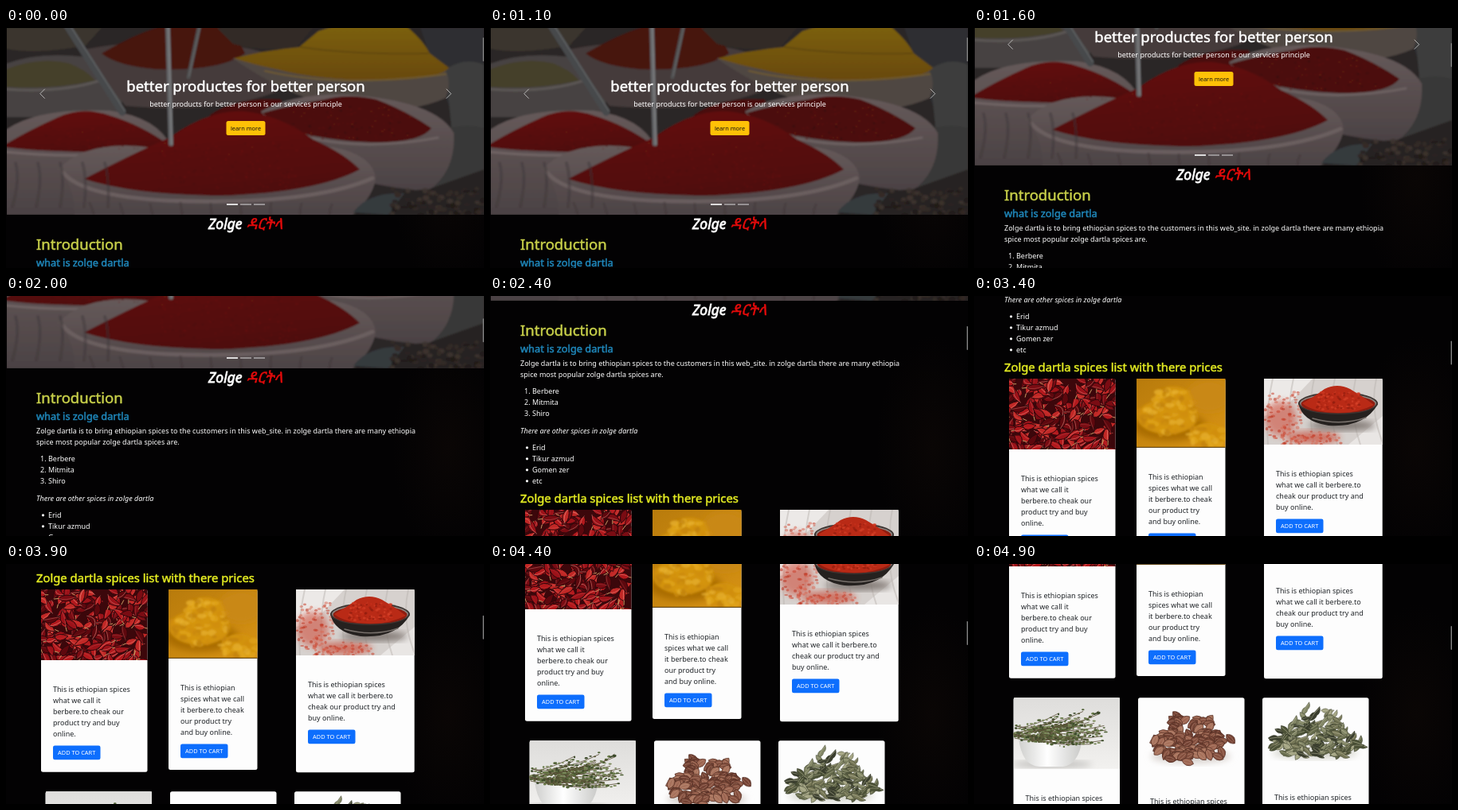
These frames come from a looping animation (600 by 302 pixels, 5 s). An HTML page:

```html
<!DOCTYPE html>
<html lang="en">
<head>
<meta charset="utf-8">
<title>Spice shop</title>
<style>
  html, body { margin: 0; width: 100%; height: 100%; overflow: hidden; background: #030203; }
  svg { display: block; width: 600px; height: 302px; }
  text { font-family: "Noto Sans", "Open Sans", sans-serif; font-size: 9px; white-space: pre; }
  .medium { stroke-width: .5px; }
  .amharic { font-family: "Noto Sans Ethiopic", "Noto Serif Ethiopic", "Noto Sans", sans-serif; }
</style>
</head>
<body>
<svg id="stage" viewBox="0 0 600 302" xmlns="http://www.w3.org/2000/svg">
  <defs>
    <filter id="soft" x="-5%" y="-5%" width="110%" height="110%"><feGaussianBlur stdDeviation="1"/></filter>
    <filter id="haze" x="-20%" y="-20%" width="140%" height="140%"><feGaussianBlur stdDeviation="4"/></filter>
    <radialGradient id="glow"><stop offset="0" stop-color="#1a0f0a" stop-opacity=".3"/><stop offset="1" stop-color="#1a0f0a" stop-opacity="0"/></radialGradient>
    <linearGradient id="bag" x1="0" y1="0" x2="0" y2="1"><stop offset="0" stop-color="#665a5a"/><stop offset="1" stop-color="#4b4244"/></linearGradient>
    <linearGradient id="red" x1="0" y1="0" x2=".3" y2="1"><stop offset="0" stop-color="#641210"/><stop offset="1" stop-color="#500a09"/></linearGradient>
    <linearGradient id="gold" x1="0" y1="0" x2="0" y2="1"><stop offset="0" stop-color="#7d6212"/><stop offset="1" stop-color="#69490b"/></linearGradient>
    <linearGradient id="wall" x1="0" y1="0" x2="0" y2="1"><stop offset="0" stop-color="#dedddb"/><stop offset="1" stop-color="#f2f1ef"/></linearGradient>
    <linearGradient id="bowl" x1="0" y1="0" x2="1" y2="0"><stop offset="0" stop-color="#cfcfcd"/><stop offset=".45" stop-color="#fff"/><stop offset="1" stop-color="#c9c9c7"/></linearGradient>
    <linearGradient id="turmeric" x1="0" y1="0" x2="1" y2="1"><stop offset="0" stop-color="#b87b0c"/><stop offset="1" stop-color="#d89314"/></linearGradient>
  </defs>
  <rect width="600" height="302" fill="#030203"/>
  <ellipse cx="555" cy="190" rx="70" ry="140" fill="url(#glow)"/>
  <g id="page"></g>
  <rect id="thumb" x="598.5" y="12" width="1.5" height="30" rx=".7" fill="#7c7c7c"/>
</svg>
<script>
const page = document.getElementById('page');
const thumb = document.getElementById('thumb');

let seed = 7;
const rnd = () => (seed = (seed * 16807) % 2147483647) / 2147483647;
const between = (a, b) => a + (b - a) * rnd();
const pick = list => list[Math.floor(rnd() * list.length)];
const n1 = v => v.toFixed(1);
const times = (n, make) => Array.from({ length: n }, (_, i) => make(i)).join('');

const rect = (x, y, w, h, fill, r = 0) =>
  `<rect x="${x}" y="${y}" width="${w}" height="${h}" rx="${r}" fill="${fill}"/>`;
const oval = (x, y, rx, ry, fill, more = '') =>
  `<ellipse cx="${n1(x)}" cy="${n1(y)}" rx="${n1(rx)}" ry="${n1(ry)}" fill="${fill}" ${more}/>`;
const shape = (d, fill, more = '') => `<path d="${d}" fill="${fill}" ${more}/>`;
const line = (d, stroke, w, more = '') =>
  `<path d="${d}" fill="none" stroke="${stroke}" stroke-width="${w}" stroke-linecap="round" ${more}/>`;
const text = (x, y, s, fill = '#fff', size = 9, more = '') =>
  `<text x="${x}" y="${y}" fill="${fill}" style="font-size:${size}px" ${more}>${s}</text>`;
const title = (x, y, s, fill, size, more = '') =>
  text(x, y, s, fill, size, `class="medium" stroke="${fill}" ${more}`);
const grains = (n, x0, x1, y0, y1, r, fills, alpha) =>
  times(n, () => oval(between(x0, x1), between(y0, y1), between(r * .6, r), between(r * .4, r * .8), pick(fills), `opacity="${alpha}"`));

function hero() {
  const reds = ['#7a1d17', '#430807', '#6a1814'];
  const photo =
    rect(-5, -5, 610, 245, '#292525') +
    // far sacks
    shape('M0 0H120L100 22Q40 34 0 26Z', '#3a342d') +
    shape('M0 45Q40 30 95 36Q140 46 150 75L140 112H0Z', '#474342') +
    shape('M0 52Q40 36 78 44Q100 52 112 66Q60 78 0 74Z', '#453f2a') +
    line('M0 77Q70 82 118 66', '#5c5755', 3) +
    shape('M95 28Q150 15 230 18Q310 20 345 40L340 80Q270 108 150 98Z', '#443b3a') +
    shape('M120 32Q160 8 200 -4H262Q290 8 300 32Q270 54 190 52Q140 48 120 32Z', '#47150f') +
    shape('M265 0H385L365 24Q320 30 285 20Z', '#332b26') +
    shape('M520 0H600V115L565 120Q540 60 520 0Z', '#2d2e31') +
    shape('M552 52Q575 36 600 46V130L560 134Z', '#3c3d3c') +
    shape('M545 130Q575 118 600 126V205L530 205Z', '#393837') +
    // yellow sack
    shape('M284 38Q330 35 365 40L545 46Q562 60 552 88Q500 112 410 98Q350 84 284 38Z', '#4f4743') +
    shape('M286 38Q325 28 368 24L392 4Q420 -6 455 -8H495Q522 12 532 32L556 50Q545 64 480 66Q390 66 340 52Q310 46 286 38Z', 'url(#gold)') +
    line('M325 54Q420 76 552 58', '#6e5a31', 2) +
    line('M370 24Q440 34 530 32', '#5c4310', 2, 'opacity=".7"') +
    // left sack
    shape('M0 128Q40 100 130 104Q190 112 208 150L175 235H0Z', 'url(#bag)') +
    shape('M0 146Q30 128 66 112Q96 98 130 110Q170 122 204 147Q140 158 70 155Q30 154 0 150Z', 'url(#red)') +
    line('M0 156Q100 166 202 152', '#6f6363', 3) +
    // right sack
    shape('M255 110Q290 86 345 90L360 125Z', '#4a0f0d') +
    shape('M320 105Q360 82 430 84Q540 92 562 132Q565 180 530 205Q430 200 350 150Z', 'url(#bag)') +
    shape('M322 107Q360 96 400 90Q430 82 465 90Q502 104 534 126Q520 144 465 144Q400 142 345 126Z', '#4b0f0c') +
    line('M362 133Q440 157 542 138', '#6c6060', 3) +
    // front sack
    shape('M66 178Q100 140 180 150H410Q462 160 464 190Q460 215 430 240H85Q90 205 66 178Z', 'url(#bag)') +
    shape('M98 190Q155 160 205 138Q255 102 300 105Q345 110 385 140Q425 158 444 178Q390 207 270 211Q160 210 98 190Z', 'url(#red)') +
    line('M72 182Q95 211 200 217Q380 224 460 189', '#706363', 5, 'opacity=".8"') +
    times(9, i => line(`M${105 + i * 38} ${220 + i % 3}q${4 - i} 8 ${6 - i} 18`, '#40383a', 3, 'opacity=".5"')) +
    times(5, i => line(`M${12 + i * 28} 170q6 20 ${i * 2 - 4} 55`, '#3f3739', 4, 'opacity=".45"')) +
    // beans
    shape('M440 235Q462 205 530 203L600 178V240H440Z', '#272423') +
    shape('M436 232Q455 206 500 208L480 235Z', '#353a3e') +
    grains(80, 485, 600, 202, 236, 4.5, ['#342a26', '#2a2220', '#3d342f', '#201b1a'], .9) +
    // scoops
    line('M76 -4L146 106', '#46484b', 9) + line('M80 -4L149 104', '#5d5f61', 2) +
    line('M203 -4L207 146', '#626366', 6) + line('M204 -4L208 146', '#7b7c7e', 2) +
    line('M243 -4L229 62', '#4f4f50', 5) + line('M244 -4L230 60', '#646465', 1.5);
  const powder = grains(150, 190, 370, 145, 203, 1.6, reds, .45) + grains(60, 45, 165, 122, 152, 1.4, reds, .45) +
    grains(110, 360, 510, 98, 140, 1.8, ['#6b1a15', '#2c0706', '#571310'], .6);
  return `<svg x="1" y="0" width="599" height="235" viewBox="1 0 599 235"><g filter="url(#soft)">${photo}${powder}</g></svg>` +
    title(301, 80, 'better productes for better person', '#fff', 18.5, 'text-anchor="middle"') +
    text(301, 99, 'better products for better person is our services principle', '#fff', 9, 'text-anchor="middle"') +
    rect(276.5, 117, 49, 18, '#ffc107', 2.5) +
    text(301, 128.6, 'learn more', '#111', 7.4, 'text-anchor="middle"') +
    line('M48.5 77L42.8 82.7L48.5 88.4', '#fff', 1, 'opacity=".6"') +
    line('M553 77L558.7 82.7L553 88.4', '#fff', 1, 'opacity=".6"') +
    [277, 294, 311].map((x, i) => `<g opacity="${i ? .5 : 1}">${rect(x, 221.2, 14, 1.6, '#fff')}</g>`).join('');
}

// True when a font for the Amharic letters is present.
function hasAmharic() {
  const c = document.createElement('canvas').getContext('2d', { willReadFrequently: true });
  const print = ch => {
    c.clearRect(0, 0, 40, 40);
    c.font = '20px "Noto Sans Ethiopic", "Noto Serif Ethiopic", "Noto Sans", sans-serif';
    c.fillText(ch, 5, 30);
    return c.getImageData(0, 0, 40, 40).data.join();
  };
  return print('ዳ') !== print('ላ');
}

function intro() {
  const amharic = hasAmharic()
    ? text(302, 252.5, 'ዳርትላ', '#e30b0b', 19, 'class="amharic" font-style="italic" stroke="#e30b0b" stroke-width=".5"')
    : `<g transform="translate(304 252.5) skewX(-12)">` +
      line('M1 -10H8M4 -10V-5M4 -5Q0 -4 1 -1M4 -5H8V0M15 -10Q18 -5 14 0H20M16 -6L20 -9M30 -11V0M26 -7H34M39 0V-4Q39 -10 42 -9Q44 -9 44 -5Q45 -10 48 -8V0', '#e30b0b', 1.7) + '</g>';
  return text(254, 252.5, 'Zolge', '#fff', 17.5, 'font-style="italic" stroke="#fff" stroke-width=".8"') + amharic +
    title(38, 279, 'Introduction', '#c8d04a', 18.5) +
    title(38, 299.5, 'what is zolge dartla', '#1f86b9', 12.8) +
    text(38, 316.7, 'Zolge dartla is to bring ethiopian spices to the customers in this web_site. in zolge dartla there are many ethiopia') +
    text(38, 330.7, 'spice most popular zolge dartla spices are.') +
    ['Berbere', 'Mitmita', 'Shiro'].map((s, i) => text(43, 352 + i * 14, i + 1 + '.') + text(53, 352 + i * 14, s)).join('') +
    text(38, 401.5, 'There are other spices in zolge dartla', '#fff', 9, 'font-style="italic"') +
    ['Erid', 'Tikur azmud', 'Gomen zer', 'etc'].map((s, i) => oval(46.5, 419.8 + i * 14, 1.6, 1.6, '#fff') + text(53, 423 + i * 14, s)).join('') +
    title(38, 489.3, 'Zolge dartla spices list with there prices', '#e3eb22', 14.8);
}

function chilies() {
  const pod = () => {
    const x = between(36, 176), y = between(494, 588), a = between(0, 6.28), l = between(13, 23);
    const dx = Math.cos(a) * l, dy = Math.sin(a) * l, b = between(-6, 6);
    const at = `${n1(x)} ${n1(y)}`, tip = `${n1(x + dx)} ${n1(y + dy)}`;
    // A curved pod, wide in the middle and pointed at its tip
    const side = w => `${n1(x + dx * .4 - (dy / l) * w - b)} ${n1(y + dy * .4 + (dx / l) * w + b)}`;
    return shape(`M${at}Q${side(8)} ${tip}Q${side(-8)} ${at}Z`, pick(['#9c1219', '#b3191d', '#7a0c13', '#c12826', '#5e080e']), 'stroke="#30060a" stroke-width="1"') +
      line(`M${at}Q${side(3)} ${tip}`, '#ec9b8c', .9, `opacity="${n1(between(0, .7))}"`) +
      (rnd() < .3 ? line(`M${at}l${n1(-dx / 4)} ${n1(-dy / 4)}`, '#c79a62', 1) : '');
  };
  return rect(44, 498, 134, 89, '#3c070b') + times(230, pod);
}

function turmeric() {
  const lump = (x, y, rx, ry, n) => oval(x, y, rx, ry, '#d3930f', 'filter="url(#soft)"') +
    times(n, () => {
      const a = between(0, 6.28), r = Math.sqrt(rnd());
      return oval(x + Math.cos(a) * rx * r, y + Math.sin(a) * ry * r, between(2, 7), between(2, 5),
        pick(['#e5ab22', '#d6960f', '#bd7d08', '#edb93a', '#cf8c0c']), 'opacity=".55"');
    });
  return rect(204, 498, 112, 87, 'url(#turmeric)') +
    oval(295, 520, 28, 20, '#c98812', 'filter="url(#haze)"') +
    oval(246, 558, 46, 18, '#a96c05', 'filter="url(#haze)"') +
    `<g filter="url(#soft)">${lump(243, 546, 38, 22, 70) + lump(250, 525, 24, 17, 45) + lump(293, 569, 23, 15, 35)}</g>` +
    line('M204 584.4H316', '#2a1c05', 1);
}

function powderBowl() {
  const fills = ['#c8301c', '#a82312', '#d9432a', '#8c1b0e'];
  return rect(364, 498, 149, 83, '#d6d1ce') +
    shape('M364 498H425L385 540L364 545Z', '#ece9e7') + shape('M470 581L513 545V581Z', '#e9e6e4') +
    times(6, i => line(`M${375 + i * 26} 498q-9 40 ${i * 3 - 6} 83`, '#bcb5b1', 2, 'opacity=".5"')) +
    oval(385, 548, 20, 22, '#cf5a48', 'filter="url(#haze)" opacity=".65"') +
    oval(425, 572, 34, 8, '#c94c38', 'filter="url(#haze)" opacity=".7"') +
    grains(90, 365, 418, 514, 580, 2.6, ['#c73f2b', '#d86a57', '#b9301d'], .55) +
    grains(50, 385, 462, 564, 581, 2.4, ['#c73f2b', '#d86a57'], .55) +
    oval(462, 557, 42, 6, '#7d7470', 'filter="url(#haze)"') +
    shape('M407 528Q411 552 445 557Q490 560 507 530Z', '#25211f') +
    line('M425 548Q460 558 492 547', '#77706b', 1.5) +
    oval(457, 529, 50, 14, '#3a3330') + oval(457, 529, 48, 12, '#8e8681') + oval(457, 530, 46.5, 11.5, '#8f1d10') +
    shape('M412 529Q428 520 440 511Q456 503 472 511Q488 520 502 531Q480 542 455 541Q425 540 412 529Z', '#b92a16') +
    grains(110, 430, 485, 514, 537, 2.2, fills, .6);
}

function thyme() {
  const greens = ['#4f6135', '#687a48', '#3b4a2a', '#7d8a5c', '#5a5b3a'];
  const twig = () => {
    const x = between(46, 120), y = between(788, 806), w = between(35, 62), h = between(-20, 9);
    const d = `M${n1(x)} ${n1(y)}q${n1(w / 2)} ${n1(h / 2 + 5)} ${n1(w)} ${n1(h)}`;
    return line(d, '#584c35', .8) + times(12, i => {
      const k = i / 11;
      return oval(x + w * k, y + h * k + 5 * k * (1 - k) * 2 + between(-3, 3), between(1, 2.6), between(.7, 1.5), pick(greens));
    });
  };
  return rect(50, 752, 133, 90, 'url(#wall)') + oval(98, 836, 50, 4, '#b9b8b5', 'filter="url(#haze)"') +
    shape('M56 803Q60 838 82 839H112Q132 836 136 803Z', 'url(#bowl)') + times(44, twig);
}

// Random places inside a rounded heap, back to front.
function heap(n, cx, top, w, h, make) {
  const spots = Array.from({ length: n }, () => {
    const v = Math.sqrt(rnd());
    const half = w / 2 * Math.min(1, .25 + v) * (v > .8 ? 1 - (v - .8) * 1.7 : 1);
    return [cx + between(-half, half), top + v * h];
  }).sort((a, b) => a[1] - b[1]);
  return spots.map(([x, y]) => make(x, y)).join('');
}

function pods() {
  const pod = (x, y) => `<g transform="translate(${n1(x)} ${n1(y)}) rotate(${n1(between(-70, 70))})">` +
    shape('M-7.5 0Q-4 -5 2 -4.6Q6 -3 8 0Q5 4.6 0 4.6Q-5 4 -7.5 0Z', pick(['#85503f', '#9c6450', '#744234', '#a8725c']), 'stroke="#4d2a20" stroke-width=".6"') +
    line('M-5 -1Q0 -3 5 -1M-5 1.6Q0 2.6 5 1', '#c29a85', .6, 'opacity=".7"') + '</g>';
  return oval(272, 826, 50, 9, '#d8d2ce', 'filter="url(#haze)"') + heap(110, 273, 768, 100, 58, pod) +
    pod(227, 806) + pod(246, 829) + pod(268, 833) + pod(306, 826) + pod(322, 804);
}

function leaves() {
  const leaf = (x, y) => {
    const c = pick(['#666b4c', '#838767', '#4c5237', '#a3a483', '#757656', '#3a3e2e']);
    return `<g transform="translate(${n1(x)} ${n1(y)}) rotate(${n1(between(-60, 60))}) scale(${n1(between(.7, 1.2))})">` +
      shape('M-9 1Q-4 -5 1 -2L9 -3Q6 3 1 2Q-4 5 -9 1Z', c, 'stroke="#3a3e2c" stroke-width=".4"') +
      line('M-7 1Q0 -2 7 -2', '#c4c3a4', .6, 'opacity=".7"') + '</g>';
  };
  return oval(428, 822, 54, 7, '#d5d5cd', 'filter="url(#haze)"') + heap(150, 428, 764, 112, 60, leaf);
}

const note = {
  a: ['This is ethiopian spices', 'what we call it', 'berbere.to cheak our', 'product try and buy', 'online.'],
  b: ['This is ethiopian', 'spices what we call', 'it berbere.to cheak', 'our product try', 'and buy online.'],
  c: ['This is ethiopian spices', 'what we call it berbere.to', 'cheak our product try and', 'buy online.']
};

function card(x, y, w, h, imgH, photo, lines, base) {
  const btn = base + lines.length * 14 - 2;
  return rect(x, y, w, h, '#fdfdfd', 2.5) +
    `<svg x="${x}" y="${y}" width="${w}" height="${imgH}" viewBox="${x} ${y} ${w} ${imgH}">${photo}</svg>` +
    lines.map((s, i) => text(x + 15, base + i * 14, s, '#212529')).join('') +
    rect(x + 15, btn, 59.5, 17.7, '#0d6efd', 2.3) +
    text(x + 44.7, btn + 11.6, 'ADD TO CART', '#fff', 7.4, 'text-anchor="middle"');
}

page.innerHTML = hero() + intro() +
  card(44, 498, 133.5, 229.7, 89, chilies(), note.a, 626.5) +
  card(204, 498, 111.5, 227, 86.8, turmeric(), note.b, 624.5) +
  card(364, 498, 148.7, 230.3, 83, powderBowl(), note.c, 620.5) +
  card(49.5, 752.3, 133.5, 230, 89.5, thyme(), note.a, 881.7) +
  card(206, 752.3, 133.5, 234, 94, pods(), note.a, 886) +
  card(362, 752.3, 133.5, 230, 89, leaves(), note.a, 881.2);

// Scroll offset over time: [ms, px]
const path = [[1300, 0], [2000, 144], [2800, 314], [3000, 326], [3400, 394], [3600, 424], [3700, 424],
  [3900, 466], [4000, 477], [4100, 477], [4300, 518], [4400, 530], [4500, 533], [4800, 581], [4900, 584]];

function scrollAt(ms) {
  const t = Math.floor(ms / 100) * 100;
  const i = path.findIndex(p => p[0] >= t);
  if (i < 1) return path[0][1];
  const [t0, y0] = path[i - 1], [t1, y1] = path[i];
  return y0 + (y1 - y0) * (t - t0) / (t1 - t0);
}

const start = performance.now();
function draw() {
  const y = scrollAt((performance.now() - start) % 5000);
  page.setAttribute('transform', `translate(0 ${-Math.round(y)})`);
  thumb.setAttribute('y', n1(12 + y * .113));
  requestAnimationFrame(draw);
}
draw();
</script>
</body>
</html>
```
